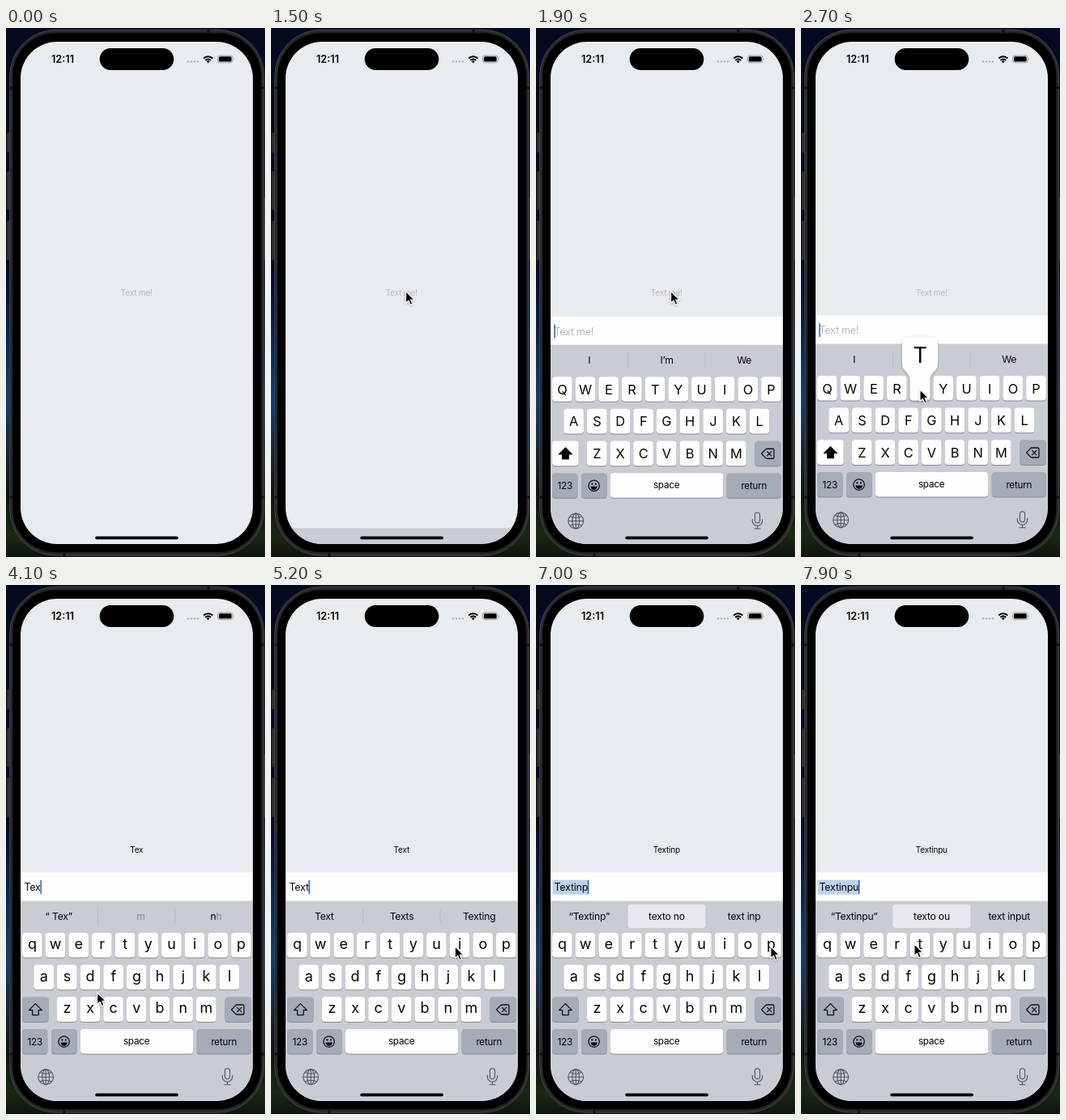
Animation of 320x654 px, one loop 8000 ms. Source, as an HTML page:

```html
<!DOCTYPE html>
<html lang="en">
<head>
<meta charset="utf-8">
<title>Typing on a phone</title>
<style>
  html, body { margin: 0; width: 100%; height: 100%; overflow: hidden; background: #040a1e; }
  svg { display: block; width: 100%; height: 100%; }
  text { font-family: Inter, Roboto, sans-serif; fill: #050505; letter-spacing: -.02em; white-space: pre; }
  .mid { text-anchor: middle; }
  .line { fill: none; stroke-linecap: round; stroke-linejoin: round; }
</style>
</head>
<body>
<svg viewBox="0 0 320 654" preserveAspectRatio="none">
  <defs>
    <linearGradient id="sky" x2="0" y2="1">
      <stop offset="0" stop-color="#050a20"/>
      <stop offset=".45" stop-color="#030a2a"/>
      <stop offset=".6" stop-color="#08275c"/>
      <stop offset=".7" stop-color="#103d78"/>
      <stop offset=".82" stop-color="#14222f"/>
      <stop offset=".88" stop-color="#0d140f"/>
      <stop offset=".96" stop-color="#1a2813"/>
      <stop offset="1" stop-color="#0e150d"/>
    </linearGradient>
    <clipPath id="glass"><rect x="18" y="17" width="287" height="621" rx="45"/></clipPath>
    <filter id="soft" x="-40%" y="-40%" width="180%" height="180%">
      <feDropShadow dx="0" dy="1" stdDeviation="1.5" flood-opacity=".28"/>
    </filter>
  </defs>

  <rect width="320" height="654" fill="url(#sky)"/>
  <g fill="#303132" stroke="#161616" stroke-width=".6">
    <rect x="1" y="129" width="6" height="25" rx="1.5"/>
    <rect x="1" y="177" width="6" height="48" rx="1.5"/>
    <rect x="1" y="238" width="6" height="49" rx="1.5"/>
    <rect x="316" y="209" width="5" height="78" rx="1.5"/>
  </g>
  <rect x="4.7" y="2.2" width="314" height="650" rx="57" fill="#202122" stroke="#454647" stroke-width="1"/>
  <rect x="6.3" y="3.8" width="310.8" height="646.8" rx="55.5" fill="none" stroke="#2e2f30" stroke-width="1.2"/>
  <path d="M4.5 74h4M4.5 580h4M315 74h4M315 580h4M250 2v4M72 649v4" stroke="#111" stroke-width="3"/>
  <rect x="8.3" y="6.5" width="307" height="641.5" rx="53" fill="#000"/>
  <rect x="18" y="17" width="287" height="621" rx="45" fill="#e8ecef"/>

  <text x="56" y="43" font-size="12.7" font-weight="600" style="letter-spacing:0">12:11</text>
  <rect x="115.7" y="25" width="91.6" height="27" rx="13.5"/>
  <path d="M225 41.5h.01M229 41.5h.01M233 41.5h.01M237 41.5h.01" class="line" stroke="#b3b6b9" stroke-width="2.6"/>
  <path d="M244.2 37.5a7.8 7.8 0 0 1 11.1 0M246.4 39.9a4.7 4.7 0 0 1 6.7 0" fill="none" stroke="#000" stroke-width="2.1"/>
  <path d="M249.75 43.4l-2-2.2a2.8 2.8 0 0 1 4 0z"/>
  <rect x="261.5" y="34" width="18.6" height="8.8" rx="2.7" fill="none" stroke="#8f9295" stroke-width=".9"/>
  <rect x="262.9" y="35.3" width="15.8" height="6.2" rx="1.6"/>
  <path d="M281 36.9q1.3 1.5 0 3z" fill="#8f9295"/>

  <g clip-path="url(#glass)">
    <text id="label" class="mid" x="161.3" y="331" font-size="10"></text>
    <g id="bar">
      <rect x="18" y="355.3" width="287" height="38" fill="#fefefe"/>
      <rect id="mark" x="20.5" y="364.6" height="18" fill="#bfd2e9"/>
      <text id="field" x="22.5" y="378.2" font-size="12.5"></text>
      <rect id="caret" y="364.8" width="1.5" height="17.4" rx=".7" fill="#3457cc"/>
    </g>
    <g id="board">
      <rect x="18" y="390.5" width="287" height="262" fill="#c9ccd3"/>
      <g id="face">
        <path d="M113.5 400.5v18M209 400.5v18" stroke="#b5b8c0" stroke-width=".8"/>
        <rect id="pick" x="113.4" y="395" width="96" height="29" rx="4" fill="#e8e9ee"/>
        <g id="hints"></g>
        <g id="keys"></g>
      </g>
      <g id="pop">
        <path id="bubble" fill="#fdfdfd" filter="url(#soft)"/>
        <text id="big" class="mid" font-size="27"></text>
      </g>
    </g>
  </g>
  <rect x="110.3" y="628.4" width="102.6" height="3.9" rx="1.95"/>
  <path id="mouse" d="M0 0V14.4L3.4 11.3 5.7 16.7 8.3 15.6 6 10.4H10.7Z" fill="#000" stroke="#fff" stroke-width="1.1" stroke-linejoin="round" filter="url(#soft)"/>
</svg>
<script>
const $ = id => document.getElementById(id);
const LOOP = 8000, HOLD = 150;
const PROMPT = 'Text me!';

// [time of press, letter]
const presses = [[2650, 'T'], [3300, 'e'], [3850, 'x'], [4550, 't'], [5400, 'i'], [6150, 'n'], [6850, 'p'], [7400, 'u']];

// Suggestions by number of typed letters
const hints = [
  ['I', 'I’m', 'We'],
  ['“T”', 'The', 'This'],
  ['“Te”', 'Ten', 'Tell'],
  ['“Tex”', 'Text', 'Texts'],
  ['Text', 'Texts', 'Texting'],
  ['“Texti”', 'texto', 'texting'],
  ['“Textin”', 'texting', 'text in'],
  ['“Textinp”', 'texto no', 'text inp'],
  ['“Textinpu”', 'texto ou', 'text input']
];

// [time, x, y] of the pointer tip
const route = [
  [300, 324, 610], [1000, 166.6, 325.6], [2300, 166.6, 325.6], [2600, 147, 447], [2850, 147, 447],
  [3250, 90, 446], [3450, 90, 446], [3800, 104, 522], [3950, 104, 522], [4100, 112.7, 504],
  [4500, 148, 446], [4720, 148, 446], [5300, 234, 447], [5560, 234, 447], [6050, 219.6, 524.6],
  [6320, 219.6, 524.6], [6750, 290, 447], [7000, 290, 447], [7330, 205, 448], [7550, 205, 448], [7900, 140, 444]
];

const rows = [['QWERTYUIOP', 32.3, 430], ['ASDFGHJKL', 46.6, 469.6], ['ZXCVBNM', 75.2, 509.3]];
const PITCH = 28.68, KEY_W = 24.6, KEY_H = 30.6;
const GREY = '#a5abb7', HINT = 12.2;
const spots = {};

const keyBox = (x, y, w, fill, id = '') =>
  `<rect x="${x}" y="${y + 1}" width="${w}" height="${KEY_H}" rx="4" fill="#898c93"/>
   <rect id="${id}" x="${x}" y="${y}" width="${w}" height="${KEY_H}" rx="4" fill="${fill}"/>`;
const word = (x, y, size, s) => `<text class="mid" x="${x}" y="${y}" font-size="${size}">${s}</text>`;
const line = (d, color = '#111', w = 1.3) => `<path class="line" d="${d}" stroke="${color}" stroke-width="${w}"/>`;

function buildKeys() {
  let out = '';
  for (const [letters, x0, y] of rows) {
    [...letters].forEach((c, i) => {
      const x = x0 + i * PITCH;
      spots[c] = { x, y };
      out += keyBox(x - KEY_W / 2, y, KEY_W, '#fefefe') + `<text class="mid" id="k${c}" x="${x}"></text>`;
    });
  }
  out += keyBox(20, 509.3, 32.6, GREY, 'shift');
  out += '<path id="arrow" d="M36.4 517.6L44.3 525.6H40.2V531.6H32.6V525.6H28.5Z" stroke="#111" stroke-width="1.3" stroke-linejoin="round"/>';
  out += keyBox(270.5, 509.3, 32.4, GREY);
  out += line('M278.6 525l5.2-5.4q.6-.6 1.4-.6h7.2q1.6 0 1.6 1.6v8.8q0 1.6-1.6 1.6h-7.2q-.8 0-1.4-.6zM285.6 522.4l5.2 5.2M290.8 522.4l-5.2 5.2');
  out += keyBox(20, 549, 31.4, GREY) + word(35.8, 569, 11.8, '123');
  out += keyBox(56, 549, 31.6, GREY);
  out += '<circle cx="71.6" cy="564.6" r="6.7" fill="none" stroke="#111" stroke-width="1.3"/>'
    + '<path d="M67.4 565.6h8.4a4.2 4.2 0 0 1-8.4 0z"/><circle cx="69.4" cy="562.4" r="1.1"/><circle cx="73.8" cy="562.4" r="1.1"/>';
  out += keyBox(92, 549, 139.2, '#fefefe') + word(161.2, 568, 11.8, 'space');
  out += keyBox(235.7, 549, 67.2, GREY) + word(269.3, 568.8, 11.7, 'return');
  out += '<g fill="none" stroke="#50545b" stroke-width="1.1"><circle cx="49.2" cy="608.3" r="9.4"/><ellipse cx="49.2" cy="608.3" rx="4.4" ry="9.4"/>'
    + '<path d="M49.2 599v18.6M39.8 608.3h18.8M42 602.6q7.2 3.4 14.4 0M42 614q7.2-3.4 14.4 0"/>'
    + '<rect x="270.4" y="597.7" width="6.2" height="13" rx="3.1"/></g>';
  out += line('M267.3 606.3v1.8a6.2 6.2 0 0 0 12.4 0v-1.8M273.5 614.4v3.4M269.9 617.8h7.2', '#50545b', 1.1);
  $('keys').innerHTML = out;
}

function setCase(upper) {
  for (const c in spots) {
    const el = $('k' + c);
    el.textContent = upper ? c : c.toLowerCase();
    el.setAttribute('y', spots[c].y + (upper ? 21.6 : 20));
    el.setAttribute('font-size', upper ? 16.4 : 18);
  }
  $('shift').setAttribute('fill', upper ? '#fefefe' : GREY);
  $('arrow').setAttribute('fill', upper ? '#000' : 'none');
}

function setText(n) {
  const typed = presses.slice(0, n).map(p => p[1]).join('');
  for (const id of ['label', 'field']) {
    $(id).textContent = typed || PROMPT;
    $(id).style.fill = typed ? '#050505' : '#b6b9bc';
  }
  const end = typed ? 22.5 + $('field').getComputedTextLength() : 22.6;
  $('caret').setAttribute('x', end - .3);
  $('mark').setAttribute('width', n > 4 ? end - 20.1 : 0);
  $('pick').style.display = n > 4 ? '' : 'none';
  setCase(n === 0);
}

function setHints(n, mixing) {
  $('hints').innerHTML = mixing
    ? word(51, 414, HINT, '“') + word(69.5, 414, HINT, 'Tex”')
      + '<g opacity=".35">' + word(166.5, 414, HINT, 'm') + word(263, 414, HINT, 'h') + '</g>' + word(256, 414, HINT, 'n')
    : hints[n].map((s, i) => word(65.8 + i * 95.7, 414, HINT, s)).join('');
}

function setPop(c) {
  $('pop').style.display = c ? '' : 'none';
  if (!c) return;
  const { x, y } = spots[c.toUpperCase()];
  const l = Math.max(20, Math.min(x - 22, 259)), r = l + 44;
  const a = x - KEY_W / 2, b = x + KEY_W / 2, top = y - 48.5, low = y + KEY_H;
  $('bubble').setAttribute('d', `M${l + 7} ${top}H${r - 7}Q${r} ${top} ${r} ${top + 7}V${y - 15}
    C${r} ${y - 5} ${b} ${y - 6} ${b} ${y + 6}V${low - 4}Q${b} ${low} ${b - 4} ${low}
    H${a + 4}Q${a} ${low} ${a} ${low - 4}V${y + 6}C${a} ${y - 6} ${l} ${y - 5} ${l} ${y - 15}V${top + 7}Q${l} ${top} ${l + 7} ${top}Z`);
  $('big').textContent = c;
  $('big').setAttribute('x', (l + r) / 2);
  $('big').setAttribute('y', y - 16.5);
}

function pointer(t) {
  if (t <= route[0][0]) return [340, 640];
  const i = route.findIndex(p => p[0] > t);
  if (i < 0) return route[route.length - 1].slice(1);
  const [t0, x0, y0] = route[i - 1], [t1, x1, y1] = route[i];
  const u = (t - t0) / (t1 - t0), e = u * u * (3 - 2 * u);
  return [x0 + (x1 - x0) * e, y0 + (y1 - y0) * e];
}

// Remaining share of a critically damped slide
function slide(t) {
  const w = Math.max(0, t - 1474) * .0174;
  return (1 + w) * Math.exp(-w);
}

let state = '';
function draw(t) {
  const rest = slide(t), shown = rest > .9 ? 0 : 1 - rest;
  $('board').setAttribute('transform', `translate(0 ${248 * rest})`);
  $('bar').setAttribute('transform', `translate(0 ${283 * rest})`);
  $('bar').setAttribute('opacity', shown);
  $('face').setAttribute('opacity', shown);
  $('mouse').setAttribute('transform', `translate(${pointer(t)})`);

  const n = presses.filter(p => t >= p[0] + HOLD).length;
  const held = presses.find(p => t >= p[0] && t < p[0] + HOLD);
  const mixing = n === 3 && t < 4200;
  const next = [n, held, mixing].join();
  if (next === state) return;
  state = next;
  setText(n);
  setHints(n, mixing);
  setPop(held && held[1]);
}

buildKeys();
const start = performance.now();
function tick() {
  draw((performance.now() - start) % LOOP);
  requestAnimationFrame(tick);
}
tick();
</script>
</body>
</html>
```
